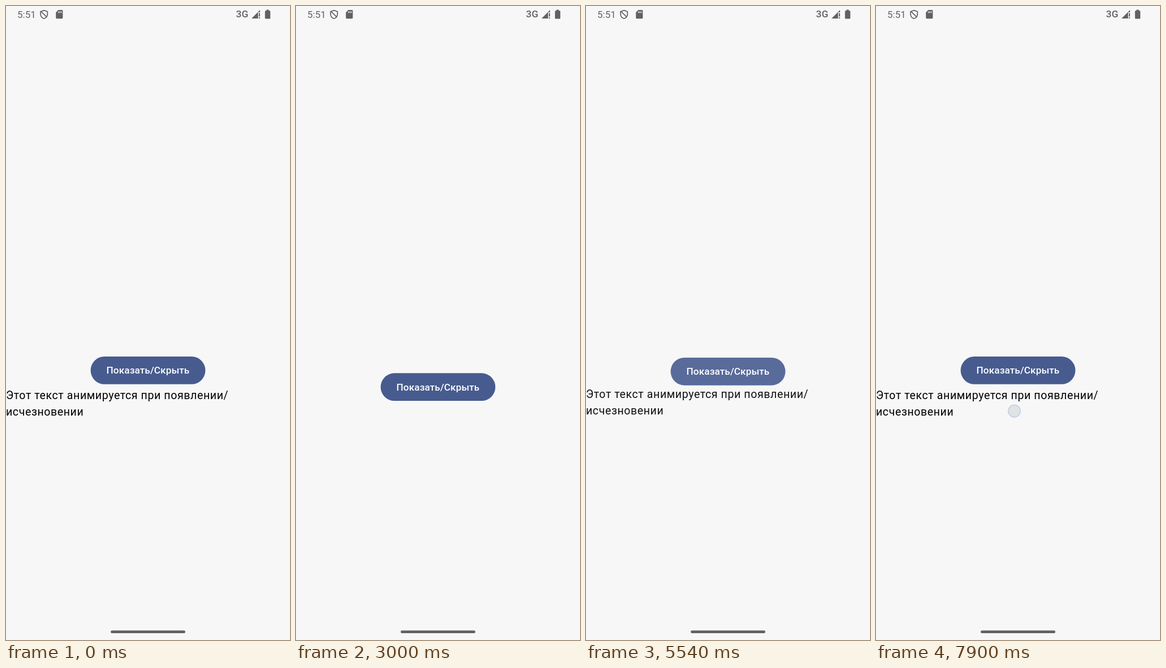
An HTML page for the animation above (8 s loop, 502 by 1116 pixels).

```html
<!DOCTYPE html>
<html lang="ru">
<head>
<meta charset="utf-8">
<title>Показать/Скрыть</title>
<style>
html, body { margin: 0; width: 100%; height: 100%; overflow: hidden; background: #f7f7f7; }
svg { display: block; width: 502px; height: 1116px; }
text { font-family: Roboto, "Noto Sans", sans-serif; white-space: pre; }
.body { font-size: 19.53px; letter-spacing: .61px; }
.label { font-size: 17.1px; font-weight: 500; letter-spacing: .12px; fill: #fff; }
.status { font-size: 17px; }
</style>
</head>
<body>
<svg viewBox="0 0 502 1116">
  <defs>
    <clipPath id="textClip"><rect id="textBox" width="502" height="60"/></clipPath>
    <clipPath id="pill"><rect x="149.6" y="617" width="202.8" height="48.8" rx="24.4"/></clipPath>
    <radialGradient id="soft">
      <stop offset=".8" stop-color="#fff"/>
      <stop offset="1" stop-color="#fff" stop-opacity="0"/>
    </radialGradient>
  </defs>
  <rect width="502" height="1116" fill="#f7f7f7"/>

  <g fill="#616161">
    <text class="status" x="20" y="20.7">5:51</text>
    <path d="M67.2 7.6 73.3 9.8V14.6C73.3 18.2 70.8 21 67.2 22.2 63.6 21 61.1 18.2 61.1 14.6V9.8Z"
      fill="none" stroke="#616161" stroke-width="1.7"/>
    <path d="M62 9.6 72 19.4" stroke="#616161" stroke-width="1.7"/>
    <path fill-rule="evenodd" d="M92.4 7H99Q100.4 7 100.4 8.4V20.8Q100.4 22.2 99 22.2H89.6Q88.2 22.2 88.2 20.8V11.2ZM92 9.4V12.2H93.4V9.4ZM94.5 9.4V12.2H95.9V9.4ZM97 9.4V12.2H98.4V9.4Z"/>
    <text class="status" x="406.6" y="20.3" font-weight="500" style="font-size:17.4px">3G</text>
    <path d="M434 22 449 7V11H445.6V22ZM447 12.6H449V18.6H447ZM447 20H449V22H447Z"/>
    <path d="M460.4 6.6H464.6V8.2H466Q467.2 8.2 467.2 9.4V21.3Q467.2 22.5 466 22.5H459Q457.8 22.5 457.8 21.3V9.4Q457.8 8.2 459 8.2H460.4Z"/>
  </g>
  <rect x="185" y="1099.3" width="132" height="4.8" rx="2.4" fill="#616161"/>

  <g clip-path="url(#textClip)">
    <g id="message" class="body">
      <text x="0" y="692.1">Этот текст анимируется при появлении/</text>
      <text x="0" y="721.4">исчезновении</text>
    </g>
  </g>

  <g id="button">
    <g clip-path="url(#pill)">
      <rect x="149" y="616" width="204" height="51" fill="#475b8f"/>
      <circle id="ripple" fill="url(#soft)"/>
    </g>
    <text class="label" x="251" y="647.3" text-anchor="middle">Показать/Скрыть</text>
  </g>
  <circle id="touch" r="10.8" fill="#d8dada" fill-opacity=".72" stroke="#8fb0dc" stroke-opacity=".55" stroke-width="1.3"/>
</svg>
<script>
const LOOP = 8000, SHIFT = 29.3, TEXT_TOP = 670.8;
const CENTER = { x: 251, y: 641.4 };

// rippleX/Y are relative to the button when the text is visible
const taps = [
  { x: 212.5, y: 629, down: 1020, up: 1870, rippleX: 212.5, rippleY: 629, start: 1020, fade: 1870, end: 3000 },
  { x: 216.7, y: 665, down: 4520, up: 4826, rippleX: 216.7, rippleY: 636, start: 4600, fade: 5700, end: 6700 }
];
const drag = { x: 188, y: 667, rx: 101, ry: 55.5, start: 6420, end: 7900, from: 65, to: 416 };

const el = id => document.getElementById(id);
const [textBox, message, button, ripple, touch] =
  ["textBox", "message", "button", "ripple", "touch"].map(el);
const clamp = v => Math.max(0, Math.min(1, v));
const span = (t, a, b) => clamp((t - a) / (b - a));
const mix = (a, b, p) => a + (b - a) * p;

function set(node, attrs) {
  for (const key in attrs) node.setAttribute(key, attrs[key]);
}

// Critically damped spring from 0 to 1
function spring(t, start) {
  const x = Math.max(0, t - start) * 0.0062;
  return x > 7 ? 1 : 1 - (1 + x) * Math.exp(-x);
}

function drawRipple(t) {
  const tap = taps.find(p => t >= p.start && t < p.end);
  if (!tap) return set(ripple, { opacity: 0 });
  const grow = 1 - (1 - span(t, tap.start, tap.start + 760)) ** 2;
  set(ripple, {
    cx: mix(tap.rippleX, CENTER.x, grow),
    cy: mix(tap.rippleY, CENTER.y, grow),
    r: mix(32, 128, grow),
    opacity: 0.1 * span(t, tap.start, tap.start + 220) * (1 - span(t, tap.fade, tap.end))
  });
}

function drawTouch(t) {
  if (t >= drag.start) {
    const p = span(t, drag.start, drag.end) ** 1.25;
    const a = mix(drag.from, drag.to, p) * Math.PI / 180;
    return set(touch, {
      cx: drag.x + drag.rx * Math.cos(a),
      cy: drag.y + drag.ry * Math.sin(a),
      opacity: 1
    });
  }
  const tap = taps.find(p => t >= p.down && t < p.up + 560);
  set(touch, tap
    ? { cx: tap.x, cy: tap.y, opacity: 1 - span(t, tap.up, tap.up + 560) }
    : { opacity: 0 });
}

function draw(t) {
  const hidden = t < 4826 ? spring(t, 1870) : 1 - spring(t, 4826);
  const shift = SHIFT * hidden;
  set(button, { transform: `translate(0 ${shift})` });
  set(message, { transform: `translate(0 ${-shift})`, opacity: 1 - hidden });
  set(textBox, { y: TEXT_TOP + shift, height: 2 * (SHIFT - shift) });
  drawRipple(t);
  drawTouch(t);
}

function tick() {
  draw(performance.now() % LOOP);
  requestAnimationFrame(tick);
}
tick();
</script>
</body>
</html>
```
